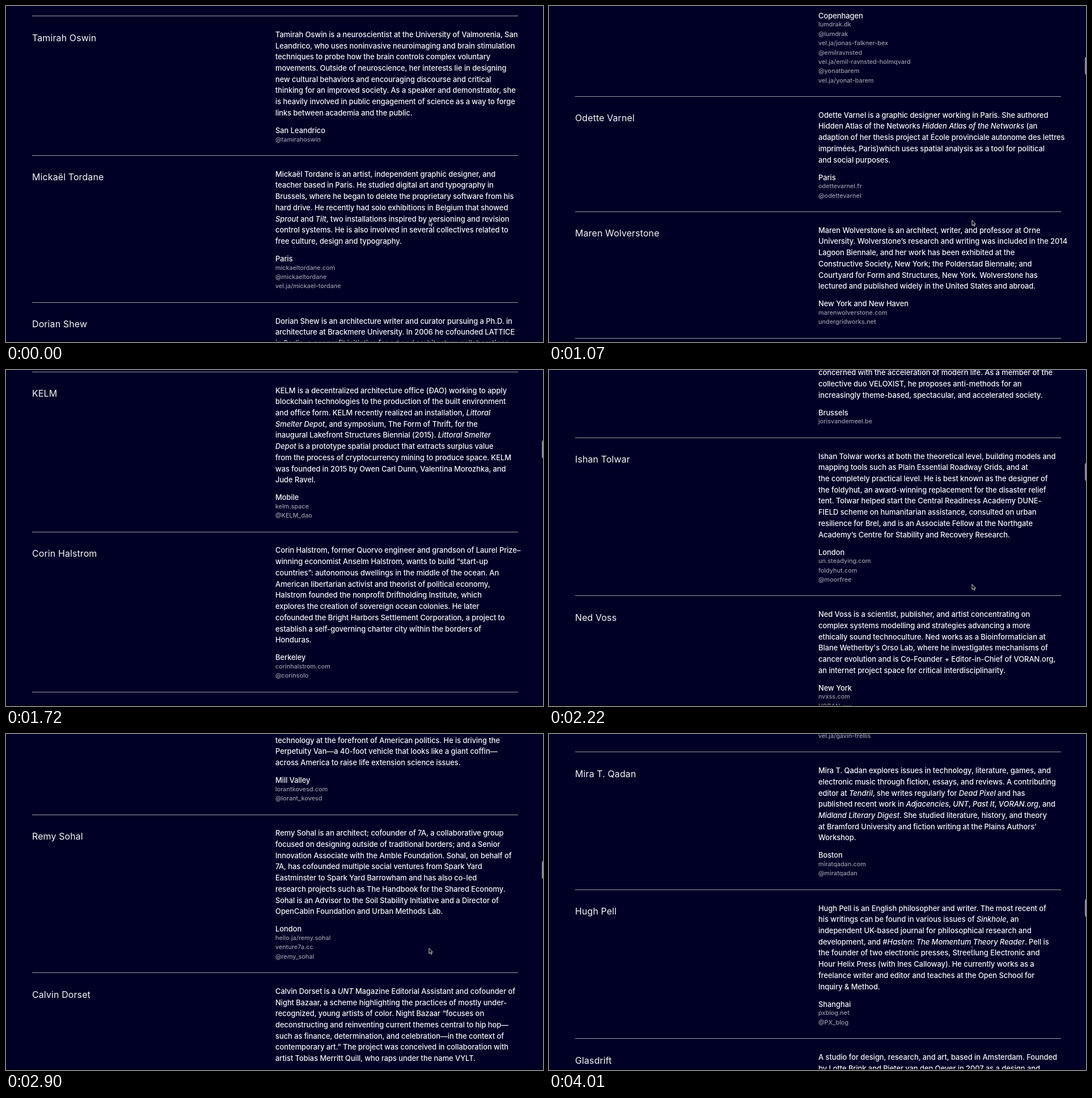
These frames come from a looping animation (947x592 px, 4110 ms). An HTML page:

```html
<!DOCTYPE html>
<html lang="en">
<head>
<meta charset="utf-8">
<title>Contributors</title>
<style>
html, body { margin: 0; width: 100%; height: 100%; overflow: hidden; background: #000026; }
body { position: relative; color: #f6f6f9; font: 500 13px/19.72px Inter, "Open Sans", sans-serif; letter-spacing: -.09px; }
#page { position: absolute; left: 46px; top: 17px; width: 857px; }
article { position: relative; border-top: 1px solid #9b9ba4; padding: 22.84px 0 19px 429px; white-space: nowrap; }
h2 { position: absolute; left: 0; top: 25.5px; margin: 0; font-size: 16px; font-weight: 400; line-height: 24px; letter-spacing: .1px; }
p { margin: 0; }
.city { margin: 11.28px 0 -2.04px; }
.links { color: #9a9aa6; font-size: 10.8px; line-height: 16.35px; letter-spacing: 0; }
#thumb { position: absolute; left: 945px; top: 0; width: 8px; height: 33px; border-radius: 4px; background: #9090a0; }
#edge { position: absolute; left: 0; right: 0; bottom: 0; height: 2px; background: rgba(0, 0, 0, .65); }
svg { position: absolute; left: 744px; top: 372px; }
</style>
</head>
<body>
<div id="page"></div>
<div id="thumb"></div>
<svg width="12" height="20">
  <path id="arrow" d="M2 5.5V15L4.2 13 5.7 16.2 7.2 15.5 5.8 12.4H8.4Z" fill="#0a0a14" stroke="#e4e4e4" stroke-width=".9"/>
  <path id="beam" d="M.6 2Q2.3 2 2.3 3V10Q2.3 11 .6 11M4 2Q2.3 2 2.3 3M4 11Q2.3 11 2.3 10" fill="none" stroke="#74747c" stroke-width=".9"/>
</svg>
<div id="edge"></div>
<script>
// Each block: name, biography lines, "> city", links.
const people = `Tamirah Oswin
Tamirah Oswin is a neuroscientist at the University of Valmorenia, San
Leandrico, who uses noninvasive neuroimaging and brain stimulation
techniques to probe how the brain controls complex voluntary
movements. Outside of neuroscience, her interests lie in designing
new cultural behaviors and encouraging discourse and critical
thinking for an improved society. As a speaker and demonstrator, she
is heavily involved in public engagement of science as a way to forge
links between academia and the public.
> San Leandrico
@tamirahoswin

Mickaël Tordane
Mickaël Tordane is an artist, independent graphic designer, and
teacher based in Paris. He studied digital art and typography in
Brussels, where he began to delete the proprietary software from his
hard drive. He recently had solo exhibitions in Belgium that showed
<i>Sprout</i> and <i>Tilt</i>, two installations inspired by versioning and revision
control systems. He is also involved in several collectives related to
free culture, design and typography.
> Paris
mickaeltordane.com
@mickaeltordane
vel.ja/mickael-tordane

Dorian Shew
Dorian Shew is an architecture writer and curator pursuing a Ph.D. in
architecture at Brackmere University. In 2006 he cofounded LATTICE
in Berlin, a nonprofit initiative for art and architecture collaborations
that hosted exhibitions, talks and performances by young artists
and architects. He has written about buildings and contemporary art
for many journals, and he lectures widely on the history of the
environment in postwar architecture.
> New York
dorianshew.com
@dorianshew

Petra Lindqvale
Petra Lindqvale is a writer and researcher whose work looks at
the ways in which networks alter the shape of cities. She teaches
courses on infrastructure and media, and has organized several
workshops on the politics of maps. Her essays have appeared in
a number of anthologies, and she is preparing a book about the
design of borders.
> Stockholm
petralindqvale.se

Lumdrak
Lumdrak is a platform and studio for transdisciplinary research and
practice, engaged with the relations between art, organization, and
science. The group develops new models for cultural institutions
through exhibitions, publications, and long-term collaborations. Its
members Jonas Falkner Bex, Emil Ravnsted Holmqvard, and Yonat
Barem share an interest in hybrid organizations and in the forms
of knowledge that they produce.
> Copenhagen
lumdrak.dk
@lumdrak
vel.ja/jonas-falkner-bex
@emilravnsted
vel.ja/emil-ravnsted-holmqvard
@yonatbarem
vel.ja/yonat-barem

Odette Varnel
Odette Varnel is a graphic designer working in Paris. She authored
Hidden Atlas of the Networks <i>Hidden Atlas of the Networks</i> (an
adaption of her thesis project at École provinciale autonome des lettres
imprimées, Paris)which uses spatial analysis as a tool for political
and social purposes.
> Paris
odettevarnel.fr
@odettevarnel

Maren Wolverstone
Maren Wolverstone is an architect, writer, and professor at Orne
University. Wolverstone’s research and writing was included in the 2014
Lagoon Biennale, and her work has been exhibited at the
Constructive Society, New York; the Polderstad Biennale; and
Courtyard for Form and Structures, New York. Wolverstone has
lectured and published widely in the United States and abroad.
> New York and New Haven
marenwolverstone.com
undergridworks.net

KELM
KELM is a decentralized architecture office (ÐAO) working to apply
blockchain technologies to the production of the built environment
and office form. KELM recently realized an installation, <i>Littoral</i>
<i>Smelter Depot</i>, and symposium, The Form of Thrift, for the
inaugural Lakefront Structures Biennial (2015). <i>Littoral Smelter</i>
<i>Depot</i> is a prototype spatial product that extracts surplus value
from the process of cryptocurrency mining to produce space. KELM
was founded in 2015 by Owen Carl Dunn, Valentina Morozhka, and
Jude Ravel.
> Mobile
kelm.space
@KELM_dao

Corin Halstrom
Corin Halstrom, former Quorvo engineer and grandson of Laurel Prize–
winning economist Anselm Halstrom, wants to build “start-up
countries”: autonomous dwellings in the middle of the ocean. An
American libertarian activist and theorist of political economy,
Halstrom founded the nonprofit Driftholding Institute, which
explores the creation of sovereign ocean colonies. He later
cofounded the Bright Harbors Settlement Corporation, a project to
establish a self-governing charter city within the borders of
Honduras.
> Berkeley
corinhalstrom.com
@corinsolo

Joris van de Meel
Joris van de Meel is an artist and architect whose practice moves
between performance, publishing, and design. He teaches studios on
speed and space, and has shown his work at many festivals and
galleries. His projects are both playful and critical, and they are
concerned with the acceleration of modern life. As a member of the
collective duo VELOXIST, he proposes anti-methods for an
increasingly theme-based, spectacular, and accelerated society.
> Brussels
jorisvandemeel.be

Ishan Tolwar
Ishan Tolwar works at both the theoretical level, building models and
mapping tools such as Plain Essential Roadway Grids, and at
the completely practical level. He is best known as the designer of
the foldyhut, an award-winning replacement for the disaster relief
tent. Tolwar helped start the Central Readiness Academy DUNE-
FIELD scheme on humanitarian assistance, consulted on urban
resilience for Brel, and is an Associate Fellow at the Northgate
Academy’s Centre for Stability and Recovery Research.
> London
un.steadying.com
foldyhut.com
@moorfree

Ned Voss
Ned Voss is a scientist, publisher, and artist concentrating on
complex systems modelling and strategies advancing a more
ethically sound technoculture. Ned works as a Bioinformatician at
Blane Wetherby's Orso Lab, where he investigates mechanisms of
cancer evolution and is Co-Founder + Editor-in-Chief of VORAN.org,
an internet project space for critical interdisciplinarity.
> New York
nvxss.com
VORAN.org

Selma Arrowind
Selma Arrowind is an artist and developer working with games,
simulation, and sound. Her recent projects consider how software
shapes the imagination of the future, and how communities can
build tools of their own. She has taught at several art schools and
has taken part in residencies in Europe and Asia. Her writing on
technology and belief has been translated into a number of
languages.
> Berlin
selmaarrowind.com
@selmaarrowind
vel.ja/selma-arrowind
arrowindgames.net

Lorant Kovesd
Lorant Kovesd is a writer, futurist, and public speaker who works on
the ethics of radical life extension. He began his career as a travel
journalist, reporting from many remote regions of the world, and
later published a novel about a philosopher in search of a longer
life. As a candidate for public office, he aims to put science and
technology at the forefront of American politics. He is driving the
Perpetuity Van—a 40-foot vehicle that looks like a giant coffin—
across America to raise life extension science issues.
> Mill Valley
lorantkovesd.com
@lorant_kovesd

Remy Sohal
Remy Sohal is an architect; cofounder of 7A, a collaborative group
focused on designing outside of traditional borders; and a Senior
Innovation Associate with the Amble Foundation. Sohal, on behalf of
7A, has cofounded multiple social ventures from Spark Yard
Eastminster to Spark Yard Barrowham and has also co-led
research projects such as The Handbook for the Shared Economy.
Sohal is an Advisor to the Soil Stability Initiative and a Director of
OpenCabin Foundation and Urban Methods Lab.
> London
hello.ja/remy.sohal
venture7a.cc
@remy_sohal

Calvin Dorset
Calvin Dorset is a <i>UNT</i> Magazine Editorial Assistant and cofounder of
Night Bazaar, a scheme highlighting the practices of mostly under-
recognized, young artists of color. Night Bazaar “focuses on
deconstructing and reinventing current themes central to hip hop—
such as finance, determination, and celebration—in the context of
contemporary art.” The project was conceived in collaboration with
artist Tobias Merritt Quill, who raps under the name VYLT.
> New York
untmagazine.com

Juhani Salmivaa
Juhani Salmivaa is an architect based in Berlin and Helsinki whose
work focuses on the intersection of technology, architectural form,
and social innovation across a variety of mediums and practices:
architectural and urban design, writing, curating, video, software, and
sound. Alongside his work as an architect, he has sustained an
international career in electronic music for the past ten years¬¬
under several aliases.
> Berlin and Helsinki
juhanisalmivaa.com
@juhanisalmivaa

Gavin Trellis
Gavin Trellis is an American artist based in Berlin. His wide-ranging
output engages with issues at the intersection of economics,
technology, culture, and collaboration from the perspective of the
prosumer imagineer artist operating within global networks. He has
exhibited internationally as part of art collective Mold-4k (since 2007)
and independently (since 2012). He co-organized FORUMVale in 2012
and is Director and CEO of Complete Vigor Inc., a Wyoming–based
corporation that functions as a vehicle for his artistic projects.
> Berlin
gvntrl.com
@gvntrl
vel.ja/gavin-trellis

Mira T. Qadan
Mira T. Qadan explores issues in technology, literature, games, and
electronic music through fiction, essays, and reviews. A contributing
editor at <i>Tendril</i>, she writes regularly for <i>Dead Pixel</i> and has
published recent work in <i>Adjacencies</i>, <i>UNT</i>, <i>Past It</i>, <i>VORAN.org</i>, and
<i>Midland Literary Digest</i>. She studied literature, history, and theory
at Bramford University and fiction writing at the Plains Authors’
Workshop.
> Boston
miratqadan.com
@miratqadan

Hugh Pell
Hugh Pell is an English philosopher and writer. The most recent of
his writings can be found in various issues of <i>Sinkhole</i>, an
independent UK-based journal for philosophical research and
development, and <i>#Hasten: The Momentum Theory Reader</i>. Pell is
the founder of two electronic presses, Streetlung Electronic and
Hour Helix Press (with Ines Calloway). He currently works as a
freelance writer and editor and teaches at the Open School for
Inquiry &amp; Method.
> Shanghai
pxblog.net
@PX_blog

Glasdrift
A studio for design, research, and art, based in Amsterdam. Founded
by Lotte Brink and Pieter van den Oever in 2007 as a design and
research practice.
> Amsterdam
glasdrift.net`;

const $ = id => document.getElementById(id);

$("page").innerHTML = people.split("\n\n").map(block => {
  const [name, ...rest] = block.split("\n");
  const cut = rest.findIndex(line => line.startsWith("> "));
  const bio = rest.slice(0, cut), links = rest.slice(cut + 1);
  return `<article><h2>${name}</h2><p>${bio.join("<br>")}</p>
    <p class="city">${rest[cut].slice(2)}</p><p class="links">${links.join("<br>")}</p></article>`;
}).join("");

// Page-down scrolling, held in hard steps: [start ms, page, px past it, text cursor]
const LOOP = 4110, PAGE = 568;
const steps = [
  [0, 0, 0, 0], [440, 0, 289, 0], [710, 1, 0, 0], [890, 1, 286, 0],
  [1070, 2, 0, 0], [1360, 2, 286, 0], [1540, 3, 0, 1], [1720, 3, 14, 1],
  [1920, 4, 0, 0], [2220, 4, 120, 0], [2430, 5, 0, 0], [2730, 5, 278, 0],
  [2900, 6, 0, 0], [3320, 6, 272, 0], [3530, 7, 0, 1], [3830, 7, 282, 1],
  [4010, 8, 0, 1]
];

function draw() {
  const t = performance.now() % LOOP;
  const [, page, extra, overText] = steps.filter(s => s[0] <= t).pop();
  const scroll = page * PAGE + extra;
  $("page").style.transform = `translateY(${-scroll}px)`;
  $("thumb").style.transform = `translateY(${22 + scroll / 16.95}px)`;
  $("thumb").style.visibility = scroll ? "visible" : "hidden";
  $("arrow").style.display = overText ? "none" : "";
  $("beam").style.display = overText ? "" : "none";
  requestAnimationFrame(draw);
}
draw();
</script>
</body>
</html>
```
